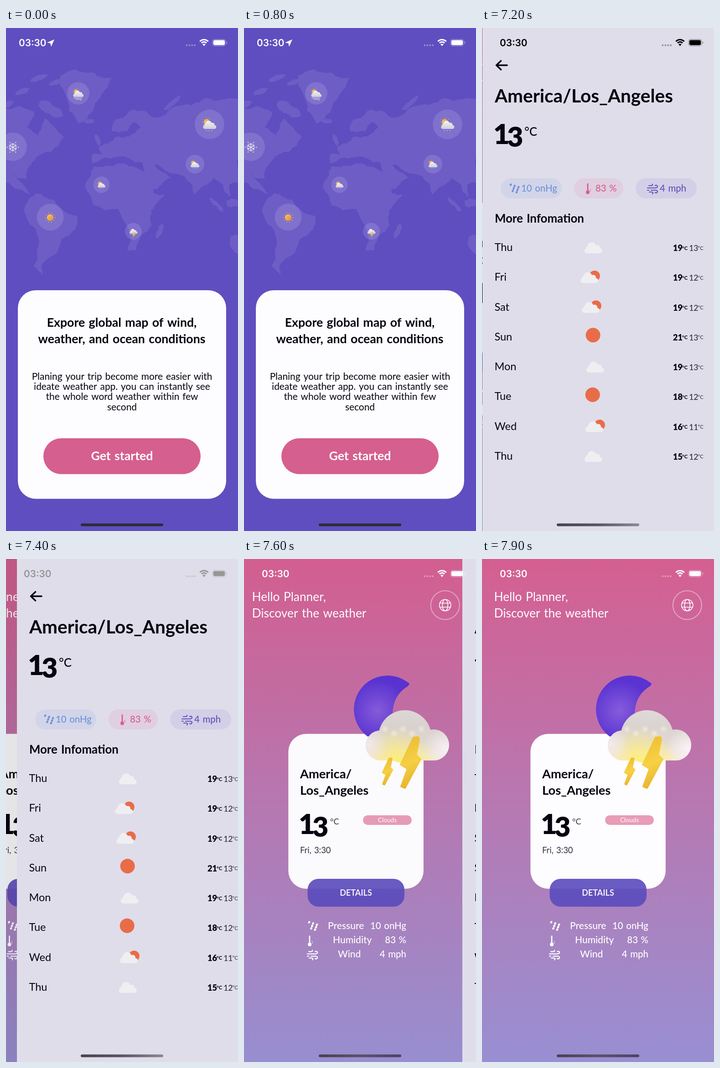
Animation, 509 px wide and 1101 px high, one loop 8 s. Source, as an HTML page with a canvas:

```html
<!DOCTYPE html>
<html lang="en">
<head>
<meta charset="utf-8">
<title>Weather app</title>
<style>
html, body { margin: 0; width: 100%; height: 100%; overflow: hidden; background: #5f4ebf; }
canvas { display: block; width: 509px; height: 1101px; }
</style>
</head>
<body>
<canvas id="stage"></canvas>
<script>
const W = 509, H = 1101, LOOP = 8000, TAU = Math.PI * 2;
const INK = '#05040f', SOFT = '#33313f', CARD = '#fdfcfe', VIOLET = '#5f4ebf';
const canvas = document.getElementById('stage');
const dpr = window.devicePixelRatio || 1;
canvas.width = W * dpr;
canvas.height = H * dpr;
const c = canvas.getContext('2d');

// Drawing helpers
function text(s, x, y, size, color = INK, weight = 400, align = 'left', family = 'Lato') {
  c.font = `${weight} ${size}px ${family}, sans-serif`;
  c.wordSpacing = size * 0.07 + 'px';
  c.textAlign = align;
  c.fillStyle = color;
  c.fillText(s, x, y);
  return c.measureText(s).width;
}
function lines(rows, x, y, pitch, size, color, weight, align) {
  rows.forEach((s, i) => text(s, x, y + i * pitch, size, color, weight, align));
}
function box(x, y, w, h, r, color) {
  c.beginPath();
  c.roundRect(x, y, w, h, r);
  c.fillStyle = color;
  c.fill();
}
function dot(x, y, r, color) {
  c.beginPath();
  c.arc(x, y, r, 0, TAU);
  c.fillStyle = color;
  c.fill();
}
function fill(path, color) {
  c.fillStyle = color;
  c.fill(path);
}
function line(d, color, width) {
  c.strokeStyle = color;
  c.lineWidth = width;
  c.lineCap = c.lineJoin = 'round';
  c.stroke(new Path2D(d));
}
function at(x, y, scale, draw) {
  c.save();
  c.translate(x, y);
  c.scale(scale, scale);
  draw();
  c.restore();
}
function ramp(x0, y0, x1, y1, ...colors) {
  const g = c.createLinearGradient(x0, y0, x1, y1);
  colors.forEach((col, i) => g.addColorStop(i / (colors.length - 1), col));
  return g;
}
function glow(x, y, r, rgb, alpha) {
  const g = c.createRadialGradient(x, y, 0, x, y, r);
  g.addColorStop(0, `rgba(${rgb},${alpha})`);
  g.addColorStop(1, `rgba(${rgb},0)`);
  dot(x, y, r, g);
}

// Status bar and home indicator
function statusBar(color, timeX) {
  text('03:30', timeX, 39.8, 20.8, color, 600, 'left', 'Inter');
  c.strokeStyle = color;
  c.lineWidth = 3;
  c.lineCap = 'butt';
  for (const r of [12.5, 7.5]) {
    c.beginPath();
    c.arc(434.5, 38, r, -Math.PI * 0.76, -Math.PI * 0.24);
    c.stroke();
  }
  fill(new Path2D('M434.5 39.5 L431 35.8 Q434.5 33 438 35.8Z'), color);
  box(454.8, 26.6, 25.4, 11, 3, color);
  c.save();
  c.globalAlpha = 0.35;
  for (let i = 0; i < 4; i++) dot(396.5 + i * 5.9, 37.7, 2, color);
  box(483.5, 29.5, 1.8, 5, 1, color);
  c.lineWidth = 1.2;
  c.beginPath();
  c.roundRect(453, 24.8, 29, 14.6, 4.5);
  c.stroke();
  c.restore();
}
function homeBar(color) {
  box(164, 1084.5, 181, 6, 3, color);
}

// World map: a few key points per landmass, roughened into a coastline
let seed = 7;
function random() {
  seed = seed * 16807 % 2147483647;
  return seed / 2147483647;
}
function coast(points, depth = 3) {
  if (!depth) return new Path2D('M' + points.join(' ') + 'Z');
  const rough = points.flatMap((p, i) => {
    const q = points[(i + 1) % points.length];
    const k = (random() - 0.5) * 0.3;
    const dx = q[0] - p[0], dy = q[1] - p[1];
    return [p, [p[0] + dx / 2 - dy * k, p[1] + dy / 2 + dx * k]];
  });
  return coast(rough, depth - 1);
}
function island(x, y, length, width, angle) {
  const ring = Array.from({ length: 7 }, (_, i) => {
    const u = Math.cos(i * TAU / 7) * length / 2, v = Math.sin(i * TAU / 7) * width / 2;
    return [x + u * Math.cos(angle) - v * Math.sin(angle), y + u * Math.sin(angle) + v * Math.cos(angle)];
  });
  return coast(ring, 2);
}
const world = new Path2D();
[
  '118,105 190,97 232,109 208,150 160,209 138,180',
  '-9,176 62,184 46,216 70,236 86,198 127,240 62,290 44,330 12,318 54,364 -9,335',
  '52,372 66,361 106,376 157,412 144,448 118,476 84,512 79,540 60,522 67,446 40,402',
  '192,302 242,297 298,312 324,362 348,366 316,414 320,432 286,486 266,488 246,396 192,388 173,350',
  '188,296 188,277 210,277 204,259 240,238 270,238 295,218 278,206 266,226 232,226 240,200 280,178 324,196 370,172 440,153 520,152 ' +
  '520,335 490,342 490,370 455,328 414,365 392,325 326,298 362,328 320,356 300,296 266,284 216,284'
].forEach(s => world.addPath(coast(s.split(' ').map(p => p.split(',').map(Number)))));
[
  [182, 204, 24, 12, 0], [201, 245, 28, 11, 1.2], [365, 164, 50, 10, -0.7], [337, 445, 36, 13, -1.2],
  [462, 387, 46, 11, 0.8], [497, 383, 30, 20, 0], [506, 473, 46, 30, 1.2], [98, 178, 62, 26, 0.5]
].forEach(a => world.addPath(island(...a)));
for (let i = 0; i < 13; i++) {
  const x = i * 37 % 112;
  world.addPath(island(x, 168 - x * 0.45 - i % 3 * 13, 26 + random() * 16, 8 + random() * 5, -0.35));
}

// Weather symbols
function puff(color) {
  c.beginPath();
  c.roundRect(0, 13, 39, 11, 5.5);
  [[9, 14, 6], [16, 9.5, 9.5], [28, 12, 6]].forEach(([x, y, r]) => {
    c.moveTo(x + r, y);
    c.arc(x, y, r, 0, TAU);
  });
  c.fillStyle = color;
  c.fill();
}
function sun(x, y, r) {
  for (let a = 0; a < TAU; a += TAU / 10) {
    dot(x + Math.cos(a) * r * 1.45, y + Math.sin(a) * r * 1.45, r * 0.12, '#edc054');
  }
  dot(x, y, r, ramp(x - r, y - r, x + r, y + r, '#f6cf52', '#e8833c'));
}
const weather = {
  sun: () => sun(0, 0, 15),
  flake() {
    for (let i = 0; i < 6; i++) {
      c.rotate(TAU / 6);
      line('M0 0 V-18 M-6 -15 L0 -10 6 -15', '#dddbe9', 3);
      dot(12, 21, 2.5, '#d0cde2');
    }
  },
  cloudy(under) {
    sun(-8, -8, 9);
    at(-19, -12, 1, () => puff(ramp(0, 0, 0, 24, '#f5f4f7', '#cfccd9')));
    under?.();
  },
  snow: () => weather.cloudy(() => [-9, -1, 7].forEach(x => dot(x, 17, 1.3, '#d5d2e6'))),
  rain: () => weather.cloudy(() => [-6, 2, 10].forEach(x => line(`M${x} 14 l-2 6`, '#5aa5e6', 3))),
  wind: () => weather.cloudy(() => line('M-17 16 H14 M-10 21 H8 q4 0 3 4', '#dcd9e8', 2.2)),
  storm() {
    at(-19, -14, 1, () => puff(ramp(0, 0, 0, 24, '#f5f4f7', '#cfccd9')));
    fill(new Path2D('M0 4 L10 4 5 12 11 12 -3 27 1 16 -6 16Z'), '#f0bc3e');
  }
};
const spots = [
  [158.5, 143, 24.5, 'wind'], [446.5, 211, 32.5, 'snow'], [15, 260, 31, 'flake'], [414.5, 298, 20.5, 'rain'],
  [209.5, 343, 18, 'snow'], [97, 414, 29.5, 'sun'], [279.5, 445, 18.5, 'storm']
];

function welcome() {
  c.fillStyle = VIOLET;
  c.fillRect(0, 0, W, H);
  fill(world, '#6d5dc5');
  for (const [x, y, r, kind] of spots) {
    dot(x, y, r, 'rgba(255,255,255,.12)');
    at(x, y + 1, 0.23 + (r - 8) * (kind === 'flake' || kind === 'sun' ? 0.012 : 0.021), weather[kind]);
  }
  box(26, 574, 457, 456.5, 39, CARD);
  lines(['Expore global map of wind,', 'weather, and ocean conditions'], 254, 654, 36, 26.7, INK, 700, 'center');
  lines(['Planing your trip become more easier with', 'ideate weather app. you can instantly see',
    'the whole word weather within few', 'second'], 254.5, 770, 22.2, 20.9, INK, 400, 'center');
  box(82, 898, 345, 78.5, 39.2, '#d55f8e');
  text('Get started', 254.5, 946, 26.7, '#fff', 700, 'center');
  homeBar('#2e2c34');
  statusBar('#fff', 28);
  fill(new Path2D('M106 25 L99 41 L97.5 33.5 L90 32Z'), '#fff');
}

// Readings shared by both app screens
const readings = [
  {
    name: 'Pressure', value: '10 onHg',
    icon(color) {
      for (let i = 0; i < 7; i++) {
        c.beginPath();
        c.ellipse(3 + i * 8.5 % 19, 3 + i * 2.7, 2.2, 2.8, 0.5, 0, TAU);
        c.fillStyle = color;
        c.fill();
      }
    }
  },
  {
    name: 'Humidity', value: '83 %',
    icon(color) {
      line('M5 1.5 V17', color, 2.8);
      dot(5, 19.5, 4, color);
      line('M10 13 l1 1 M10 17 l1 -1', color, 1.2);
    }
  },
  {
    name: 'Wind', value: '4 mph',
    icon(color) {
      line('M4 5 H9 q4 0 3 -3 M1 10 H19 q5 -1 4 -4 q-2 -3 -5 -1 M1 15 h3 M9 15 H20 q5 2 2 5 q-2 2 -4 0 M5 19 h6 q4 1 1 4', color, 2.2);
    }
  }
];
function bigTemp(x, y) {
  text('1', x - 3, y, 61, INK, 900);
  text('3', x + 27, y + 6, 61, INK, 900);
}

// Forecast screen
const days = [
  ['Thu', 19, 13, 'cloud'], ['Fri', 19, 12, 'both'], ['Sat', 19, 12, 'both'], ['Sun', 21, 13, 'sun'],
  ['Mon', 19, 13, 'cloud'], ['Tue', 18, 12, 'sun'], ['Wed', 16, 11, 'both'], ['Thu', 15, 12, 'cloud']
];
const skyWidth = { cloud: 39, both: 43, sun: 32 };
const pills = [
  [40, 134, '#d2d5e8', '#7090dc', 59, 85], [201, 108, '#e0cfe0', '#d4608f', 226, 248],
  [336, 134, '#d3cfe6', '#6551bd', 361, 389]
];
function dayRow([day, high, low, sky], i) {
  const y = 488 + i * 65.25;
  const right = 26.5 + text(day, 26.5, y, 23.5);
  // The symbol sits midway between the day and the temperatures
  const x = (right + 420 - skyWidth[sky]) / 2;
  if (sky === 'sun') dot(x + 16, y - 11.5, 16, '#e96c49');
  if (sky === 'both') dot(x + 31, y - 10.5, 11.8, '#e96c49');
  if (sky !== 'sun') at(x, y - 19, 1, () => puff('#efeef1'));
  text(high, 439, y, 18.2, INK, 900, 'right');
  text('°C', 438, y - 2.5, 11.4, INK, 700);
  text(low, 473.5, y, 17.5, SOFT, 500, 'right');
  text('°C', 472.5, y - 2.5, 11.4, SOFT);
}
function forecast(arrowAlpha) {
  c.fillStyle = '#dfddea';
  c.fillRect(0, 0, W, H);
  c.save();
  c.globalAlpha = arrowAlpha;
  line('M54 81.5 H31 M40.5 72 L30.5 81.5 40.5 91', INK, 3.6);
  c.restore();
  text('America/Los_Angeles', 27, 163, 40.5, INK, 700);
  bigTemp(27, 253.5);
  text('°C', 92, 235.5, 26, INK, 500);
  pills.forEach(([x, w, bg, fg, iconX, valueX], i) => {
    box(x, 329, w, 44, 22, bg);
    at(iconX, 340, 1, () => readings[i].icon(fg));
    text(readings[i].value, valueX, 358, 20.4, fg, 500);
  });
  text('More Infomation', 27, 426, 25.8, INK, 700);
  days.forEach(dayRow);
}

// Home screen
const moon = new Path2D();
moon.arc(324, 329, 74, -0.9, 2.2, true);
moon.lineTo(340, 380);
moon.bezierCurveTo(328, 330, 338, 297, 368, 279);
moon.quadraticCurveTo(375, 273, 370, 271);
const cloud = new Path2D();
[[309, 408, 33], [362, 389, 58], [425, 407, 34]].forEach(([x, y, r]) => {
  cloud.moveTo(x + r, y);
  cloud.arc(x, y, r, 0, TAU);
});
cloud.rect(309, 400, 116, 41);

function bolt() {
  const d = 'M31 4 L41 3 43 8 36 42 46 51 12 114 4 111 18 72 3 63Z';
  const gold = ramp(0, 0, 48, 116, '#eebb2e', '#f7d145', '#e5ad27');
  fill(new Path2D(d), gold);
  line(d, gold, 4);
}
function stormArt() {
  c.save();
  c.clip(moon);
  fill(moon, '#5a33d2');
  glow(302, 332, 66, '138,96,220', 0.9);
  c.restore();
  c.save();
  c.clip(cloud);
  c.fillStyle = ramp(0, 331, 0, 441, '#dfd9d8', '#dad3d0', '#e2dad3', '#f3e9dc');
  c.fillRect(270, 330, 190, 115);
  glow(345, 442, 75, '255,238,120', 1);
  glow(400, 440, 40, '255,240,150', 0.6);
  glow(452, 415, 48, '250,242,248', 0.95);
  glow(282, 405, 42, '246,238,244', 0.8);
  for (let i = 0; i < 5; i++) glow(318 + i * 20, 372 + i % 2 * 10, 9, '255,248,235', 0.55);
  c.restore();
  at(350, 387, 1, bolt);
  at(311, 434, 0.53, bolt);
}
function globe() {
  c.strokeStyle = 'rgba(255,255,255,.4)';
  c.lineWidth = 2.2;
  c.beginPath();
  c.arc(450.3, 101, 31.5, 0, TAU);
  c.stroke();
  c.strokeStyle = '#fff';
  c.lineWidth = 1.7;
  for (const rx of [12.5, 6]) {
    c.beginPath();
    c.ellipse(450.3, 101, rx, 12.5, 0, 0, TAU);
    c.stroke();
  }
  line('M439 96.5 H461.5 M439 105.5 H461.5', '#fff', 1.5);
}
function home() {
  c.fillStyle = ramp(0, 0, 0, H, '#d55f91', '#b679b2', '#988fd2');
  c.fillRect(0, 0, W + 160, H);
  lines(['Hello Planner,', 'Discover the weather'], 26.5, 92, 36, 26.3, '#fff');
  globe();
  box(106.3, 382.7, 296.6, 339, 39, CARD);
  stormArt();
  lines(['America/', 'Los_Angeles'], 132, 480, 36, 27.3, INK, 700);
  bigTemp(132, 602);
  text('°C', 198, 581, 18, SOFT);
  text('Fri, 3:30', 132, 644, 18.4, SOFT);
  box(270, 561, 107, 21, 10.5, '#e89cb5');
  text('Clouds', 323.5, 576, 13.6, '#fff', 400, 'center');
  box(148.5, 700, 212.5, 61, 24, 'rgba(92,76,190,.91)');
  text('DETAILS', 254.5, 737, 18, '#f4f0fa', 700, 'center');
  readings.forEach(({ name, value, icon }, i) => {
    const y = 810 + i * 31.2;
    at(149 - i, y - 18 + i % 2, 1, () => icon('#fff'));
    text(name, 193 + i * 11, y, 21, '#fff', 500);
    text(value, 365, y, 20.4, '#fff', 500, 'right');
  });
}

// Critically damped slide back to the home screen; 1 means forecast fully in place
function remaining(t) {
  if (t < 7400) return 1;
  if (t >= 7900) return 0;
  const k = 0.021 * (t - 7384);
  return (1 + k) * Math.exp(-k);
}
function app(t) {
  const left = remaining(t);
  const x = left ? Math.round(W - left * (W - 1)) : W;
  c.save();
  c.beginPath();
  c.rect(0, 0, x, H);
  c.clip();
  c.translate(-0.3 * (W - x), 0);
  home();
  c.fillStyle = `rgba(0,0,0,${0.1 * left})`;
  c.fillRect(0, 0, W + 160, H);
  c.restore();
  if (x < W) at(x, 0, 1, () => forecast(Math.min(1, left * 1.15)));
  homeBar(ramp(164, 1084, 345, 1091, '#46404f', '#5a5364', x < 300 ? '#8b8896' : '#4d4263'));
  const shade = Math.min(255, Math.max(0, (t - 7300) * 1.5));
  statusBar(`rgb(${shade},${shade},${shade})`, 39);
}

// Time advances in tenths of a second, like a screen recording
const start = performance.now();
function frame() {
  const t = Math.floor((performance.now() - start) % LOOP / 100) * 100;
  c.setTransform(dpr, 0, 0, dpr, 0, 0);
  if (t < 900) welcome();
  else app(t);
  requestAnimationFrame(frame);
}
requestAnimationFrame(frame);
</script>
</body>
</html>
```
